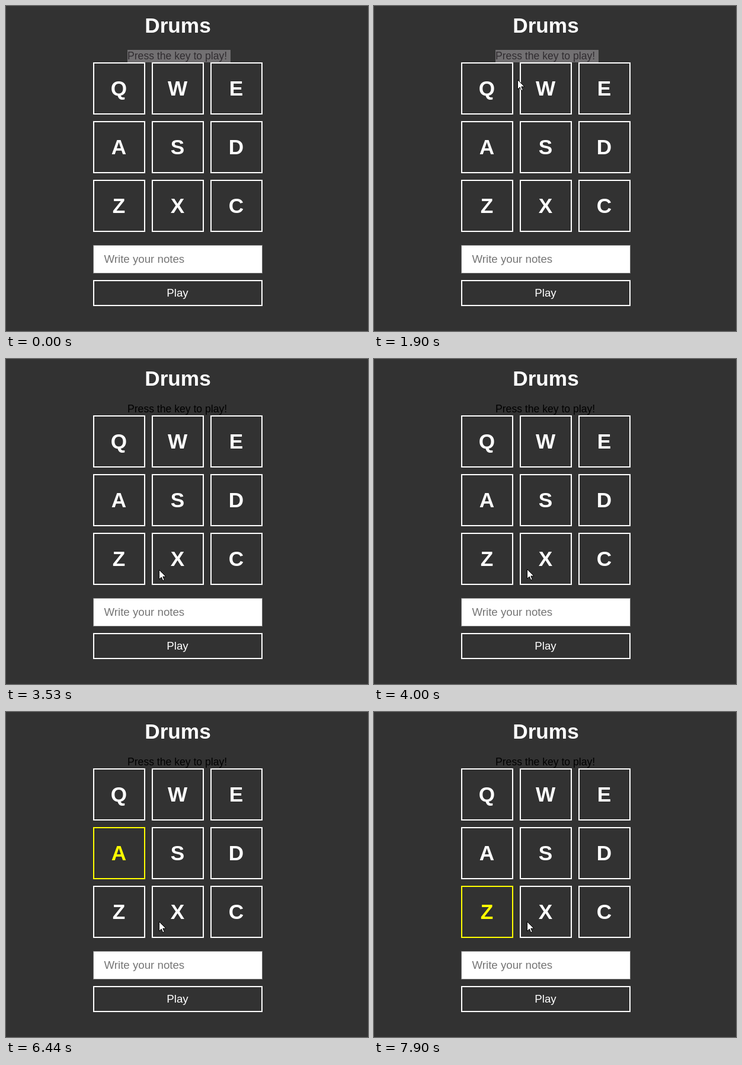
An HTML page that plays this animation: 611 px wide and 548 px high, repeating every 8000 ms.

```html
<!DOCTYPE html>
<html lang="en">
<head>
<meta charset="utf-8">
<title>Drums</title>
<style>
  html, body { margin: 0; width: 100%; height: 100%; overflow: hidden; background: #323232; }
  svg { display: block; width: 100%; height: 100%; }
  text { font: 18.7px "Liberation Sans", Arial, sans-serif; fill: #fff; }
  .big { font-size: 35.2px; font-weight: bold; }
  .mid { text-anchor: middle; }
  .box { fill: none; stroke: #fff; stroke-width: 2; }
  .on .box { stroke: #ff0; }
  .on text { fill: #ff0; }
  #hint { font-size: 17.6px; }
  #beam { fill: none; stroke: #fff; mix-blend-mode: difference; }
</style>
</head>
<body>
<svg viewBox="0 0 611 548">
  <rect width="611" height="548" fill="#323232"/>
  <text class="big mid" x="290" y="45">Drums</text>
  <rect id="mark" x="205" y="74" width="174" height="21" fill="#727072"/>
  <text id="hint" x="205" y="90">Press the key to play!</text>
  <g id="pads"></g>
  <rect x="147.5" y="403.5" width="285" height="47" fill="#fff" stroke="#767676"/>
  <text x="165.5" y="433" style="fill:#757575">Write your notes</text>
  <rect class="box" x="148" y="463" width="284" height="42"/>
  <text class="mid" x="289.5" y="490">Play</text>
  <path id="arrow" d="M.5.5V16.5L4.3 13L6.8 18.8L9.3 17.7L6.8 12H12Z" fill="#fff" stroke="#000"/>
  <path id="beam" d="M-3-7.5h2.5M.5-7.5h2.5M0-7V7M-3 7.5h2.5M.5 7.5h2.5"/>
</svg>
<script>
const LOOP = 8000, HIT = 330, CLEAR = 2250;
const get = id => document.getElementById(id);
const mark = get('mark'), hint = get('hint'), arrow = get('arrow'), beam = get('beam');

// Key presses: letter and start time
const hits = [['Q', 3200], ['W', 3665], ['S', 4600], ['Q', 4860], ['E', 5650],
              ['A', 6440], ['D', 6840], ['X', 7370], ['Z', 7900]];

// Pointer strokes: start time, then x,y positions one STEP apart
const STEP = 70;
const strokes = [
  [450, '541,530 511,488 461,408 443,344 419,258 390,170 362,110 348,84'],
  [1270, '350,78 351,69 350,62 352,46 345,50 331,60 312,74 290,90 266,107 242,124 218,138 198,147'],
  [2110, '190,147 187,148 191,149'],
  [2380, '194.5,148'],
  [2990, '198,158 207,196 224,255 242,318 254,350 258,358'],
  [3530, '258,355'],
  [3930, '258,354'],
  [5650, '258,353']
].map(([start, list]) => ({ start, points: list.split(' ').map(p => p.split(',').map(Number)) }));

const pads = {};
[...'QWEASDZXC'].forEach((key, i) => {
  const x = 147 + i % 3 * 99, y = 95 + Math.floor(i / 3) * 99;
  const pad = document.createElementNS('http://www.w3.org/2000/svg', 'g');
  pad.innerHTML = `<rect class="box" x="${x + 1}" y="${y + 1}" width="86" height="86"/>
    <text class="big mid" x="${x + 43.5}" y="${y + 56}">${key}</text>`;
  get('pads').append(pad);
  pads[key] = pad;
});

function pointerAt(t) {
  const stroke = strokes.findLast(s => t >= s.start);
  if (!stroke) return null;
  const i = Math.floor((t - stroke.start) / STEP);
  return stroke.points[Math.min(i, stroke.points.length - 1)];
}

function place(el, point) {
  el.style.display = point ? '' : 'none';
  if (point) el.setAttribute('transform', `translate(${point})`);
}

function draw(t) {
  const selected = t < CLEAR;
  mark.style.display = selected ? '' : 'none';
  hint.style.fill = selected ? '#302c30' : '#000';

  for (const key in pads) {
    const lit = hits.some(([k, at]) => k === key && t >= at && t < at + HIT);
    pads[key].classList.toggle('on', lit);
  }

  const point = pointerAt(t);
  const overText = t >= 2040 && t < 2990;
  place(arrow, overText ? null : point);
  place(beam, overText ? point : null);
}

function tick() {
  draw(performance.now() % LOOP);
  requestAnimationFrame(tick);
}
tick();
</script>
</body>
</html>
```
